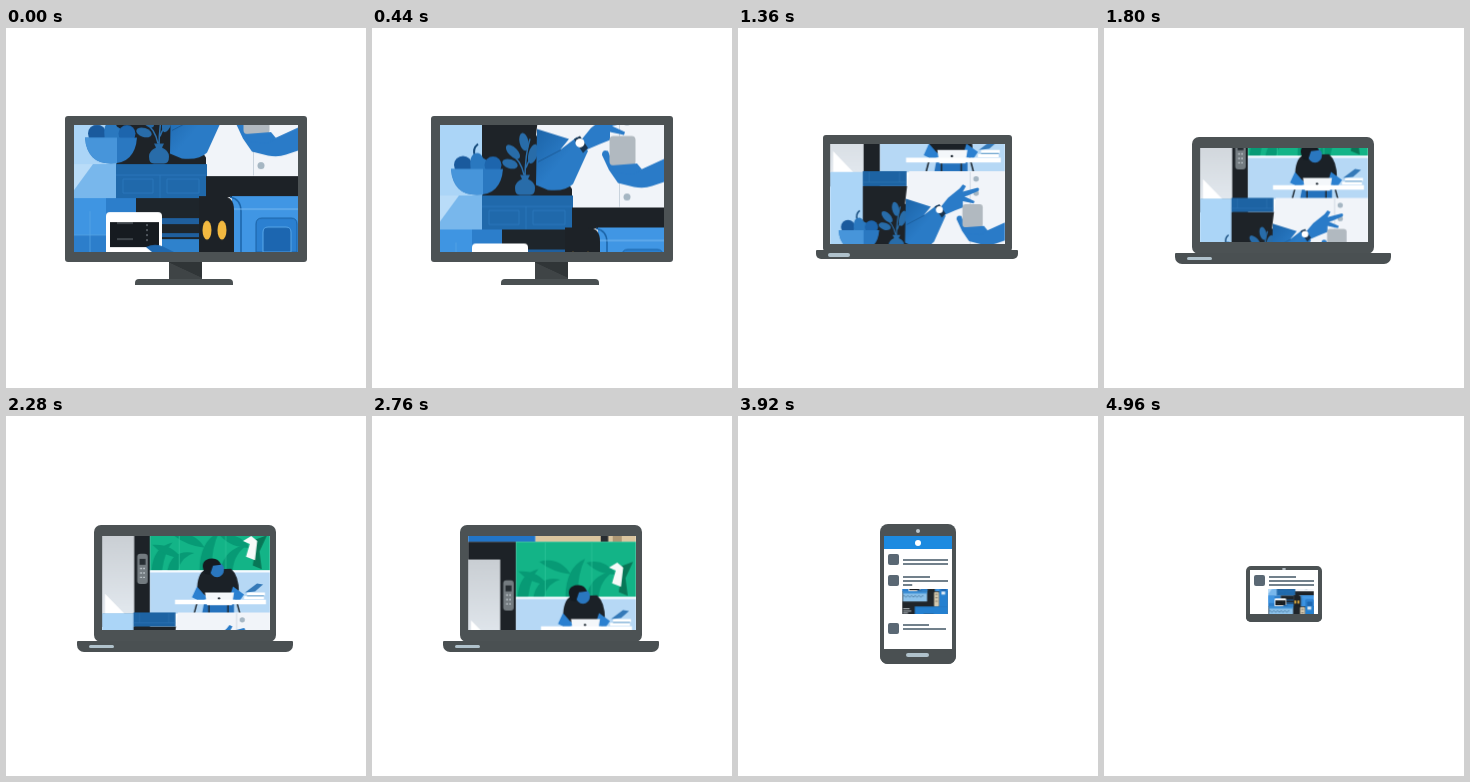
Write an HTML page that moves like this. It is 360 by 360 pixels and loops after 5 s.

```html
<!DOCTYPE html>
<html lang="en">
<head>
<meta charset="utf-8">
<title>One story, every screen</title>
<style>
  html, body { margin: 0; width: 100%; height: 100%; overflow: hidden; background: #fff; }
  div { position: absolute; animation: 5s linear infinite both; }
  svg { display: block; width: 100%; height: 100%; }
  #stage { left: 0; top: 0; width: 360px; height: 360px; overflow: hidden; }

  /* device */
  #neck { left: 163px; top: 234px; width: 33px; background: linear-gradient(25deg, #3f4446 50%, #303537 52%); animation-name: neck; }
  #lid { background: #4c5254; animation-name: lid; }
  #base { background: #4a5052; animation-name: base; }
  #pill { background: #b0c2cc; border-radius: 2px; animation-name: pill; }
  #cam { background: #bcc6cc; border-radius: 50%; animation-name: cam; }

  @keyframes neck {
    0%, 18% { height: 17px; animation-timing-function: ease-in-out; }
    21.6%, 100% { height: 0; }
  }
  @keyframes lid {
    0%, 22% { left: 59px; top: 88px; width: 242px; height: 146px; border-radius: 3px; animation-timing-function: ease-in-out; }
    27.2% { left: 85px; top: 107px; width: 189px; height: 116px; border-radius: 3px; animation-timing-function: ease-out; }
    33.6%, 56% { left: 88px; top: 109px; width: 182px; height: 117px; border-radius: 7px; animation-timing-function: ease-in-out; }
    64% { left: 138px; top: 111px; width: 82px; height: 122px; border-radius: 4px; animation-timing-function: ease-out; }
    68%, 89.6% { left: 142px; top: 108px; width: 76px; height: 140px; border-radius: 8px; animation-timing-function: ease-in-out; }
    97.6%, 100% { left: 142px; top: 150px; width: 76px; height: 56px; border-radius: 5px; }
  }
  @keyframes base {
    0%, 18% { left: 129px; top: 251px; width: 98px; height: 6px; border-radius: 4px 4px 0 0; animation-timing-function: ease-in-out; }
    21.6%, 22% { left: 129px; top: 228px; width: 98px; height: 6px; border-radius: 2px; animation-timing-function: ease-in-out; }
    27.2% { left: 78.500px; top: 222px; width: 201px; height: 9px; border-radius: 1px 1px 5px 5px; animation-timing-function: ease-out; }
    33.6%, 56% { left: 71px; top: 225px; width: 216px; height: 11px; border-radius: 1px 1px 7px 7px; animation-timing-function: ease-in-out; }
    64% { left: 142px; top: 224px; width: 76px; height: 21px; border-radius: 0 0 7px 7px; animation-timing-function: ease-out; }
    68%, 89.6% { left: 142px; top: 233px; width: 76px; height: 15px; border-radius: 0 0 8px 8px; animation-timing-function: ease-in-out; }
    97.6%, 100% { left: 142px; top: 198px; width: 76px; height: 8px; border-radius: 0 0 5px 5px; }
  }
  @keyframes pill {
    0%, 22% { left: 134px; top: 229px; width: 0; height: 3px; animation-timing-function: ease-in-out; }
    27.2% { left: 90px; top: 225px; width: 22px; height: 3.500px; animation-timing-function: ease-out; }
    33.6%, 56% { left: 83px; top: 229px; width: 25px; height: 3px; animation-timing-function: ease-in-out; }
    64% { left: 168px; top: 232px; width: 23px; height: 4px; animation-timing-function: ease-out; }
    68%, 89.6% { left: 168px; top: 237px; width: 23px; height: 4px; animation-timing-function: ease-in-out; }
    97.6%, 100% { left: 180px; top: 202px; width: 0; height: 0; }
  }
  @keyframes cam {
    0%, 65% { left: 180px; top: 115px; width: 0; height: 0; }
    68%, 89.6% { left: 178px; top: 113px; width: 4px; height: 4px; animation-timing-function: ease-in-out; }
    97.6%, 100% { left: 178px; top: 152px; width: 4px; height: 2px; }
  }

  /* feed: a full-stage sheet cut to the screen */
  #feed { inset: 0; background: #fff; animation-name: screen; }
  #bar { left: 146px; top: 120px; width: 68px; background: #1c8ae0; overflow: hidden; animation-name: bar; }
  #bar i { position: absolute; left: 31px; top: 3.5px; width: 6px; height: 6px; border-radius: 50%; background: #fff; }
  #shade { left: 146px; top: 203px; width: 68px; height: 21px; background: linear-gradient(#fff, #dfe1e3); animation-name: shade; }
  .face { left: 150px; width: 11px; height: 11px; border-radius: 2px; background: #5a6874; animation-name: grow; animation-delay: var(--d, 0s); }
  .line { left: 164.5px; height: 1.5px; background: #71808b; transform-origin: left; animation-name: type; animation-delay: var(--d, 0s); }

  @keyframes screen {
    0%, 22% { clip-path: inset(97px 68px 136px 68px); animation-timing-function: ease-in-out; }
    27.2% { clip-path: inset(116px 93px 144px 92px); animation-timing-function: ease-out; }
    33.6%, 56% { clip-path: inset(120px 96px 146px 96px); animation-timing-function: ease-in-out; }
    64% { clip-path: inset(120px 146px 136px 146px); animation-timing-function: ease-out; }
    68%, 89.6% { clip-path: inset(120px 146px 127px 146px); animation-timing-function: ease-in-out; }
    97.6%, 100% { clip-path: inset(154px 146px 162px 146px); }
  }
  @keyframes bar {
    0%, 61% { height: 0; }
    64% { height: 4px; animation-timing-function: ease-out; }
    68%, 100% { height: 13px; }
  }
  @keyframes shade {
    0%, 58%, 68%, 100% { opacity: 0; }
    64% { opacity: 1; }
  }
  @keyframes grow {
    0%, 62.8% { transform: scale(0); }
    64% { transform: scale(.27); animation-timing-function: ease-out; }
    68%, 100% { transform: none; }
  }
  @keyframes type {
    0%, 67% { transform: scaleX(0); }
    71%, 100% { transform: none; }
  }

  /* picture */
  #pic { overflow: hidden; animation-name: pic; }
  #world { animation: scroll 5s linear infinite; }
  @keyframes pic {
    0%, 22% { left: 68px; top: 97px; width: 224px; height: 127px; animation-timing-function: ease-in-out; }
    27.2% { left: 92px; top: 116px; width: 175px; height: 100px; animation-timing-function: ease-out; }
    33.6%, 56% { left: 96px; top: 120px; width: 168px; height: 94px; animation-timing-function: ease-in-out; }
    64% { left: 155px; top: 165px; width: 62px; height: 36px; animation-timing-function: ease-out; }
    68%, 100% { left: 164px; top: 173px; width: 46px; height: 25px; }
  }
  @keyframes scroll {
    0% { transform: translateY(0); }
    27.2% { transform: translateY(97px); }
    64% { transform: translateY(234.6px); }
    78.4% { transform: translateY(362.3px); }
    100% { transform: translateY(441.5px); }
  }
</style>
</head>
<body>
<div id="stage">
  <div id="neck"></div>
  <div id="lid"></div>
  <div id="base"></div>
  <div id="pill"></div>
  <div id="cam"></div>

  <div id="feed">
    <div id="shade"></div>
    <div id="bar"><i></i></div>
    <div class="face" style="top:138px"></div>
    <div class="line" style="top:143px;width:45px"></div>
    <div class="line" style="top:147px;width:45px;--d:.05s"></div>
    <div class="face" style="top:159px;--d:.1s"></div>
    <div class="line" style="top:160px;width:27px;--d:.15s"></div>
    <div class="line" style="top:164px;width:45px;--d:.25s"></div>
    <div class="line" style="top:168px;width:45px;--d:.53s"></div>
    <div class="face" style="top:207px;--d:.2s"></div>
    <div class="line" style="top:208px;width:26px;--d:.3s"></div>
    <div class="line" style="top:212px;width:43px;--d:.36s"></div>
  </div>

  <div id="pic">
    <svg viewBox="0 0 224 127" preserveAspectRatio="none">
      <defs>
        <linearGradient id="wall" x2="0" y2="1">
          <stop stop-color="#c9ced3"/><stop offset="1" stop-color="#e2e8ee"/>
        </linearGradient>
        <linearGradient id="skin" x2="1" y2="1">
          <stop stop-color="#1c64a8"/><stop offset=".5" stop-color="#2a7bc6"/>
        </linearGradient>
      </defs>
      <g id="world">
        <g id="house">
          <!-- attic -->
          <rect y="-351" width="224" height="117" fill="#20252a"/>
          <rect x="4" y="-351" width="118" height="52" fill="#8dc2ea"/>
          <rect x="4" y="-351" width="118" height="12" fill="#3d8fd5"/>
          <path d="M6-325q5-7 9 0t9 0 9 0 9 0 9 0 9 0 9 0 9 0 9 0 9 0 9 0" fill="none" stroke="#27587f" stroke-width="3"/>
          <rect x="180" y="-351" width="44" height="80" fill="#2480d0"/>
          <rect x="156" y="-347" width="24" height="73" rx="5" fill="#d3c8ae"/>
          <path d="M162-335h12M162-318h12M162-300h12" stroke="#756d62" stroke-width="4"/>
          <rect x="192" y="-350" width="18" height="16" fill="#dceaf5"/>
          <path d="M62-274H224V-230H62z" fill="#2480d0"/>
          <path d="M5-262h32M5-250h40M5-240h24" stroke="#e5edf3" stroke-width="4"/>

          <!-- shelf -->
          <rect y="-234" width="90" height="40" fill="#2275c8"/>
          <rect x="90" y="-234" width="134" height="40" fill="#dac59f"/>
          <path d="M105-234h50v9h-50z" fill="#f3f5f7" stroke="#292e35" stroke-width="3"/>
          <rect x="177" y="-234" width="10" height="40" fill="#272c31"/>
          <path d="M193-225h12v31h-12z" fill="#ad9774"/>

          <!-- garden window and desk -->
          <rect y="-194" width="64" height="151" fill="#1d2227"/>
          <rect y="-170" width="43" height="109" fill="url(#wall)"/>
          <path d="M4-88v27h26z" fill="#fff"/>
          <rect x="64" y="-194" width="160" height="75" fill="#13b487"/>
          <g fill="#079a75">
            <path d="M66-119q2-32 28-38-10 10-14 38zM87-119q6-30 36-24-18 5-22 24zM130-119q0-40 26-52-10 20-10 52zM158-119q4-30 38-36-20 12-22 36z"/>
            <path d="M95-167q26-8 42 17-24-3-42-17zM158-166q24-6 40 16-26 0-40-16zM67-154q25-2 39 18-25-2-39-18z"/>
          </g>
          <path d="M103-194v75M165-194v75" stroke="#2ec49a"/>
          <path d="M202-160l18-7-10 22 3 24-12-5 3-19z" fill="#087757"/>
          <path d="M188-159l11-7 8 7-3 26-12-5 5-17z" fill="#f6faf9"/>
          <rect x="64" y="-119" width="160" height="58" fill="#b6d8f5"/>
          <path d="M64-118H224" stroke="#f5faff" stroke-width="3"/>
          <rect x="47" y="-142" width="14" height="41" rx="4" fill="#737b80"/>
          <rect x="50" y="-135" width="8" height="8" fill="#272e33"/>
          <path d="M51-122h6M51-116h6M51-110h6" stroke="#cbd3d8" stroke-width="2" stroke-dasharray="2"/>
          <g transform="translate(-128 -327) scale(1.3333)">
            <path d="M198 189h30v11h-32z" fill="#2572bd"/>
            <path d="M193 181l-5 19M229 181l5 19M203 190v10M222 190v10" stroke="#202a33" stroke-width="1.5"/>
            <path d="M199 155q-8 4-8 22l5 5h30l7-4q0-17-8-24z" fill="#1b2127"/>
            <path d="M191 172l-5 11 8 4 9-3-5-4zM227 172l11 8-4 6-11-1z" fill="#2b80d0"/>
            <ellipse cx="211" cy="155" rx="7" ry="7.5" fill="#2a77bf"/>
            <path d="M199 159q-6-12 4-15 9-2 12 6l-8 1-3 9z" fill="#151b21"/>
            <path d="M199 178h29l-2 13h-25z" fill="#f4f7fa"/>
            <circle cx="213" cy="184" r="1.2" fill="#202a33"/>
            <path d="M169 185.5h91v4.5h-91z" fill="#fff"/>
            <path d="M241 178h18v3h-18zM238 182h20v3h-20z" fill="#fff"/>
            <path d="M241 181.5h17" stroke="#669fca"/>
            <path d="M239 178l12-9 6 1-8 7z" fill="#3479b8"/>
          </g>

          <!-- kitchen -->
          <g transform="translate(-68 -158.6)">
            <rect x="68" y="97" width="43" height="101" fill="#abd5f7"/>
            <rect x="110" y="115" width="95" height="83" fill="#1e2328"/>
            <rect x="110" y="96" width="56" height="19" fill="#1d63a3"/>
            <path d="M110 110h56M118 97v13M157 97v13" stroke="#3379b8" stroke-width=".7"/>
            <path d="M169 96H292V210H200V191L164 137z" fill="#f1f4f9"/>
            <path d="M247.500 97V209" stroke="#c9d3dd"/>
            <g fill="#a5b6c3"><circle cx="255" cy="106" r="3.500"/><circle cx="255" cy="124" r="3.500"/><circle cx="255" cy="199" r="3.500"/></g>

            <path d="M103 158q-3-7 3-12" fill="none" stroke="#174c7d" stroke-width="2"/>
            <circle cx="91" cy="167" r="9" fill="#1a5a9d"/>
            <path d="M99 173q-3-17 6-18 4 0 6 5 8 3 5 14z" fill="#2a78bf"/>
            <circle cx="121" cy="167" r="8.500" fill="#1d65ad"/>
            <path d="M79 171h52q-2 26-26 26t-26-26z" fill="#2a78c1"/>
            <path d="M79 171h32v26h-6q-24 0-26-26z" fill="#4795da"/>

            <path d="M153 181q0-24 5-40M152 177q-3-15-15-23M154 170q3-10 12-17" fill="none" stroke="#2c70ac" stroke-width="1.500"/>
            <g fill="#286ca9">
              <ellipse rx="4.500" ry="9" transform="translate(152 144) rotate(-12)"/>
              <ellipse rx="4.500" ry="9" transform="translate(141 154) rotate(-45)"/>
              <ellipse rx="4.500" ry="8" transform="translate(138 166) rotate(-72)"/>
              <ellipse rx="4.500" ry="10" transform="translate(161 156) rotate(16)"/>
              <path d="M148 177h10l-2 4q7 3 7 9 0 7-5 7h-10q-5 0-5-7 0-6 7-9z"/>
            </g>

            <path d="M165 131l32 10-9 11 17-13 11 14-15 33q-8 8-25 6l-12-5z" fill="url(#skin)"/>
            <path d="M166 164l23-12" stroke="#174f87" stroke-width=".7"/>
            <g fill="#2a7bc8">
              <path d="M210 141l9-11 15-12 4-5 4 2-4 7 19-5q3 1 1 4l-14 6-4 1 13 6-1 3-14-3v8l-10 4-14 6z"/>
              <path d="M292 161l-24 11-6-2-22-7-4-10q-6-2-6 4l7 15 9 13 16 4q10 2 18-1l12-4z"/>
            </g>
            <path d="M202 141l6-3 8 12-5 5z" fill="#19344f"/>
            <circle cx="208" cy="145" r="4.500" fill="#fff"/>
            <rect x="237.500" y="138" width="26" height="29.500" rx="4" fill="#b1b9c0"/>
            <path d="M239 167.500l26-2 5 6-9 5-18-2z" fill="#2a7bc8"/>
          </g>

          <!-- cabinets -->
          <g transform="translate(-68 -97)">
            <rect x="68" y="136" width="43" height="35" fill="#78b7ec"/>
            <path d="M68 136h19l-19 26z" fill="#b9dcf8"/>
            <rect x="110" y="136" width="91" height="35" fill="#2069ab"/>
            <path d="M110 147h90M154 147v23M117 151h30v14h-30zM161 151h32v14h-32z" fill="none" stroke="#2f7dc0" stroke-width=".7"/>
            <rect x="200" y="148" width="92" height="21" fill="#1d2227"/>
            <rect x="68" y="170" width="63" height="54" fill="#2c7ecb"/>
            <path d="M68 170h32v37h-32z" fill="#3f95e2"/>
            <path d="M68 207h33M84 183v41" stroke="#5aa6e6" stroke-width=".7"/>
            <rect x="130" y="170" width="65" height="54" fill="#1e252b"/>
            <path d="M156 190h37v6h-37zM156 205h37v4h-37z" fill="#1f5f9e"/>
            <path d="M156 211h38v13h-38z" fill="#2f82cc"/>
            <rect x="226" y="168" width="66" height="56" fill="#4096e4"/>
            <path d="M193 224v-56h23q12 0 12 14v42z" fill="#1d2227"/>
            <path d="M224 169q11 2 11 14v41" fill="none" stroke="#1b64a8" stroke-width="1.500"/>
            <path d="M228 181h64" stroke="#78b9f0"/>
            <path d="M250 224v-28q0-6 6-6h29q6 0 6 6v28z" fill="#2b80d1" stroke="#1a61a4"/>
            <path d="M257 224v-20q0-5 5-5h18q5 0 5 5v20z" fill="#1c66b0" stroke="#59a8ea"/>
            <g fill="#f2b940"><ellipse cx="201" cy="202" rx="4.500" ry="9.500"/><ellipse cx="216" cy="202" rx="4.500" ry="9.500"/></g>
            <path d="M100 224v-36q0-4 4-4h48q4 0 4 4v36z" fill="#fff"/>
            <rect x="104" y="194" width="49" height="25" fill="#161b20"/>
            <path d="M111 195h16M111 211h16" stroke="#697077"/>
            <path d="M141 196v17" stroke="#8a9299" stroke-dasharray="2 3"/>
            <path d="M140 219q8-4 16-1l12 6h-22z" fill="#1f69b0"/>
          </g>
        </g>
        <use href="#house" y="-478"/>
      </g>
    </svg>
  </div>
</div>
</body>
</html>
```
